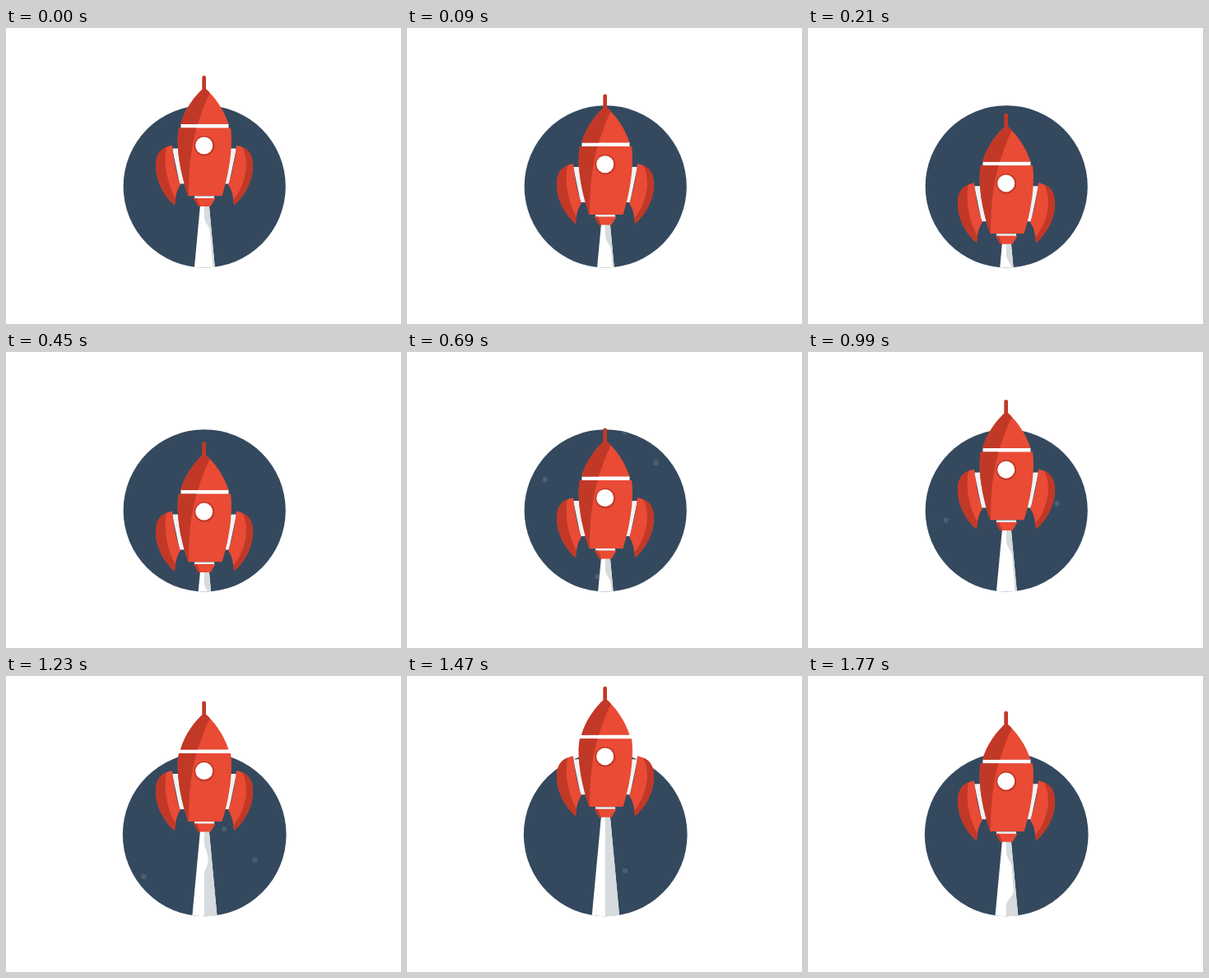
An HTML page for the animation above (1830 ms loop, 480 by 360 pixels).

```html
<!DOCTYPE html>
<html lang="en">
<head>
<meta charset="utf-8">
<title>Rocket</title>
<style>
html, body { margin: 0; width: 100%; height: 100%; overflow: hidden; background: #fff; }
svg { display: block; width: 480px; height: 360px; }
.red { fill: #e94b35; }
.dark { fill: #c23827; }
.pale { fill: #f0f2f3; }
</style>
</head>
<body>
<svg viewBox="0 0 480 360">
  <defs>
    <clipPath id="porthole"><circle class="disc" cx="241.2" cy="192.800"/></clipPath>
    <clipPath id="hull">
      <path d="M241 15C229 25 217 42 212 59.500H270.500C265 42 253 25 241 15Z"/>
      <path d="M210 64H273C276 84 272 117 262.500 147H221.500C211 117 206 84 210 64Z"/>
    </clipPath>
    <g id="fin">
      <path class="pale" d="M202 89H212L222 132H211Z"/>
      <path class="red" d="M202 85C187 88 182 98 182 110C182 130 193 148 205 158C206 145 208 139 212 133C207 120 204 103 202 85Z"/>
    </g>
  </defs>
  <circle class="disc" cx="241.2" cy="192.800" fill="#34495e"/>
  <g clip-path="url(#porthole)">
    <g id="stars" fill="#4c5e71">
      <circle cx="167.700" cy="155" r="3.200"/>
      <circle cx="302.500" cy="134.700" r="3.200"/>
      <circle cx="231.500" cy="273" r="3.200"/>
      <circle cx="265" cy="97" r="3.200"/>
    </g>
    <path id="trail" fill="#fff"/>
    <path id="shade" fill="#d6dbde"/>
  </g>
  <g id="rocket">
    <use href="#fin"/>
    <use href="#fin" transform="matrix(-1 0 0 1 482 0)"/>
    <path class="dark" d="M195 87C185 91 182 99 182 110C182 130 193 148 205 158L206 150C196 132 191 108 195 87Z"/>
    <path class="dark" d="M287 87C297 91 300 99 300 110C300 130 289 148 277 158L276.500 151C291 134 297 106 287 87Z"/>
    <path class="dark" d="M238.300 22V2.500Q238.300 0.500 240.700 0.500T243 2.500V22Z"/>
    <path fill="#fff" d="M212.500 59H270.500V64.500H212.500Z"/>
    <g clip-path="url(#hull)">
      <path class="red" d="M200 10H282V150H200Z"/>
      <path class="dark" d="M200 10H241L248 21C242 33 237 47 232.500 61C227 80 222 105 222 148H200Z"/>
    </g>
    <circle class="dark" cx="241" cy="86" r="12.300"/>
    <circle cx="240.700" cy="85.600" r="10.500" fill="#fff"/>
    <path class="pale" d="M229 147H253V150H229Z"/>
    <path class="red" d="M228 149.500H254.500L248.500 159.500H233.500Z"/>
    <path class="dark" d="M228 149.500H232L236 159.500H233.500Z"/>
  </g>
</svg>
<script>
const LOOP = 1830;
const FALL = 620, RISE = 1300;
const LOWEST = 320;   // time at which the rocket hangs lowest
const TURN = 1560;    // time at which it starts to fall again
const $ = id => document.getElementById(id);
const discs = document.querySelectorAll('.disc');

function smooth(a, b, x) {
  const u = Math.min(1, Math.max(0, (x - a) / (b - a)));
  return u * u * (3 - 2 * u);
}

// A quick cosine fall, then a slow cosine rise
function rocketTop(t) {
  const sinceLowest = (t > TURN ? t - LOOP : t) - LOWEST;
  const phase = sinceLowest / (sinceLowest < 0 ? FALL : RISE);
  return 60 + 51 * Math.cos(Math.PI * phase);
}

// Stars pass steadily, faster once the rocket nears its top
function starDrift(t) {
  return 0.165 * (t - 690) + 0.0475 * Math.max(0, t - 1230);
}

// The white puff in the trail swells and sinks as the nozzle drops
function drawTrail(nozzle) {
  const mid = 241.4, bottom = 294;
  const half = y => 5.5 + (y - nozzle) * 0.093;
  const drop = nozzle - 189;
  const center = 222 + 2 * drop, reach = 20 + drop;
  const size = Math.min(0.85, 0.53 + drop / 45);
  const edge = [];
  for (let y = bottom; y > nozzle; y -= 3) {
    const puff = size * smooth(center - reach, center - reach + 18, y)
      * (1 - smooth(center + reach - 18, center + reach, y));
    edge.push(`${mid - 0.6 + puff * half(y)} ${y}`);
  }
  const right = `${mid + half(nozzle)} ${nozzle}L${mid + half(bottom)} ${bottom}`;
  $('trail').setAttribute('d', `M${mid - half(nozzle)} ${nozzle}L${right}H${mid - half(bottom)}Z`);
  $('shade').setAttribute('d', `M${mid - 0.6} ${nozzle}L${right}L${edge.join('L')}Z`);
}

function draw(now) {
  const clock = now % LOOP;
  const step = clock < 210 ? 30 : 60;
  const t = 210 + Math.floor((clock - 210) / step) * step;
  const top = rocketTop(t);
  $('rocket').setAttribute('transform', `translate(0 ${top})`);
  $('stars').setAttribute('transform', `translate(0 ${starDrift(t)})`);
  discs.forEach(disc => disc.setAttribute('r', t > 1050 ? 99.4 : 98.6));
  drawTrail(top + 159);
}

const begin = performance.now();
function tick() {
  draw(performance.now() - begin);
  requestAnimationFrame(tick);
}
tick();
</script>
</body>
</html>
```
